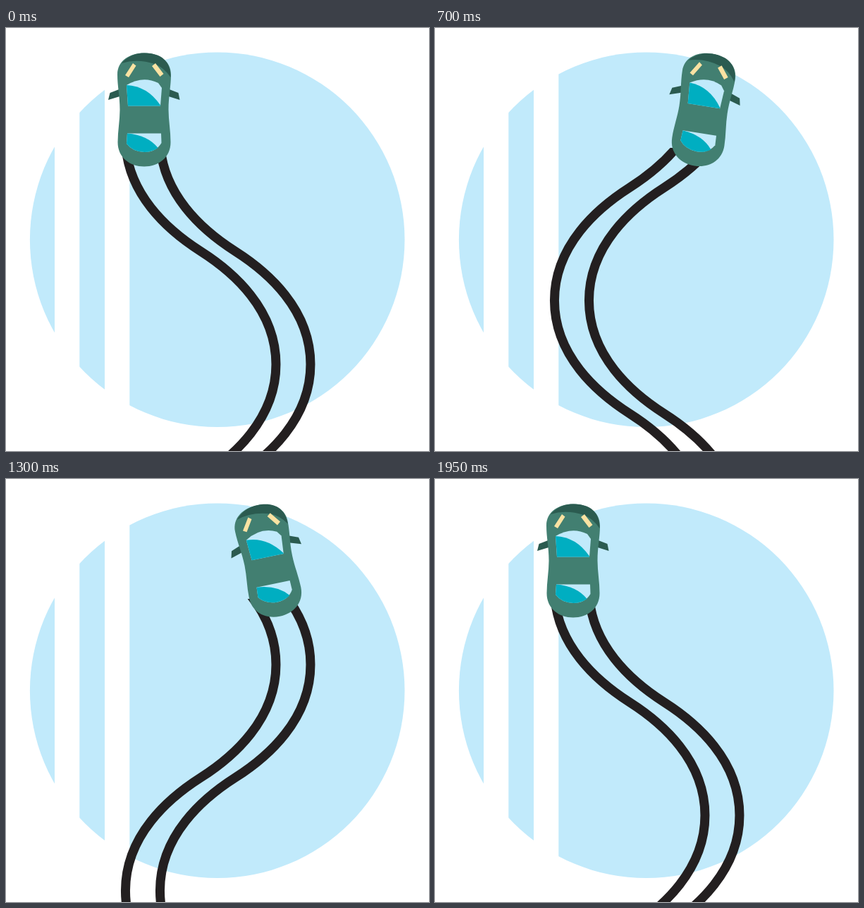
Write an HTML page with a canvas that moves like this. It is 600 by 600 pixels and loops after 2 s.

```html
<!DOCTYPE html>
<html lang="en">
<head>
<meta charset="utf-8">
<title>Winding drive</title>
<style>
  html, body { margin: 0; width: 100%; height: 100%; overflow: hidden; background: #fff; }
  canvas { display: block; width: 600px; height: 600px; }
</style>
</head>
<body>
<canvas id="stage" width="600" height="600"></canvas>
<script>
const ctx = document.getElementById('stage').getContext('2d');
const STEP = 50, STEPS = 40;
const WAVE = 641.5, SWING = 106.75;
const SKY = '#c1eafb', BODY = '#427f71', DARK = '#2b5b50',
      TEAL = '#00aec1', LAMP = '#fbe2a2', TYRE = '#231f20';

// Car parts, relative to the car's middle
const mirrorL = new Path2D('M-51-14L-48.5-24L-33-30L-33-19.5Z');
const mirrorR = new Path2D('M50.5-14L48.5-24L33-30L33-19.5Z');
const body = new Path2D('M-38-50C-38-70-20-80.5 0-80.5C20-80.5 38-70 38-50' +
  'C38-33 34.5-20 34.5 0C34.5 15 37.5 30 37.5 46C37.5 68 20 80.5 0 80.5' +
  'C-20 80.5-37.5 68-37.5 46C-37.5 30-34.5 15-34.5 0C-34.5-20-38-33-38-50Z');
const hood = new Path2D('M-32-66Q-19-80.5 0-80.5C24-80.5 38-69 37.5-46Q28-60 15-65Q-10-73-32-66Z');
const lamps = new Path2D('M-16-66L-11.5-62.5L-22-46L-27-49Z M11-62L16-66L27.5-51L22.5-47Z');
const screen = new Path2D('M-25-35Q-2-49 20-38L25-31L23-5.5L-23-5.5Z');
const screenTint = new Path2D('M-25-35Q4-34 23-6.5L23-5.5L-23-5.5Z');
const rear = new Path2D('M-24 33.5L24 33.5L24.5 47Q17 60 0 60Q-17 59-25 48Z');
const rearTint = new Path2D('M-24 33.5Q5 36 19.5 54Q11 60 0 60Q-17 59-25 48Z');

function fill(path, color) {
  ctx.fillStyle = color;
  ctx.fill(path);
}

function drawBackdrop() {
  ctx.fillStyle = '#fff';
  ctx.fillRect(0, 0, 600, 600);
  ctx.fillStyle = SKY;
  ctx.beginPath();
  ctx.arc(299.7, 300.3, 265.8, 0, 7);
  ctx.fill();
  ctx.fillStyle = '#fff';
  ctx.fillRect(69, 0, 35.3, 600);
  ctx.fillRect(140, 0, 35.3, 600);
}

// Half a bend, from one side at y to the other side
function bend(x, y, side) {
  const edge = side * SWING, h = WAVE / 4;
  ctx.bezierCurveTo(x + edge, y + 78, x + side * 46.2, y + h - 29.4, x, y + h);
  ctx.bezierCurveTo(x - side * 46.2, y + h + 29.4, x - edge, y + 2 * h - 78, x - edge, y + 2 * h);
}

function drawTrack(x, top) {
  ctx.beginPath();
  ctx.moveTo(x - SWING, top);
  for (let i = 0; i < 4; i++) bend(x, top + i * WAVE / 2, i % 2 ? 1 : -1);
  ctx.stroke();
}

function drawTracks(phase) {
  const top = 156.3 + (phase - 1) * WAVE;
  ctx.save();
  ctx.beginPath();
  ctx.rect(0, 170, 600, 430);
  ctx.clip();
  ctx.strokeStyle = TYRE;
  ctx.lineWidth = 13;
  drawTrack(276.2, top);
  drawTrack(325.2, top);
  ctx.restore();
}

function drawCar(phase) {
  const a = phase * 2 * Math.PI, lag = a - 0.033, s = Math.sin(a);
  const x = 299.5 - 103.5 * (1.115 * Math.cos(lag) - 0.115 * Math.cos(3 * lag));
  const tilt = 14.5 * s + 1.8 * Math.sin(2 * a) - 0.8 * s * s;
  ctx.save();
  ctx.translate(x, 116);
  ctx.rotate(tilt * Math.PI / 180);
  fill(mirrorL, DARK);
  fill(mirrorR, DARK);
  fill(body, BODY);
  fill(hood, DARK);
  fill(lamps, LAMP);
  fill(screen, SKY);
  fill(screenTint, TEAL);
  fill(rear, SKY);
  fill(rearTint, TEAL);
  ctx.restore();
}

// Both ends of the loop hold the same pose
function draw(ms) {
  const phase = Math.floor(ms / STEP) % STEPS / (STEPS - 1);
  drawBackdrop();
  drawTracks(phase);
  drawCar(phase);
}

const start = performance.now();
function tick() {
  draw(performance.now() - start);
  requestAnimationFrame(tick);
}
tick();
</script>
</body>
</html>
```
